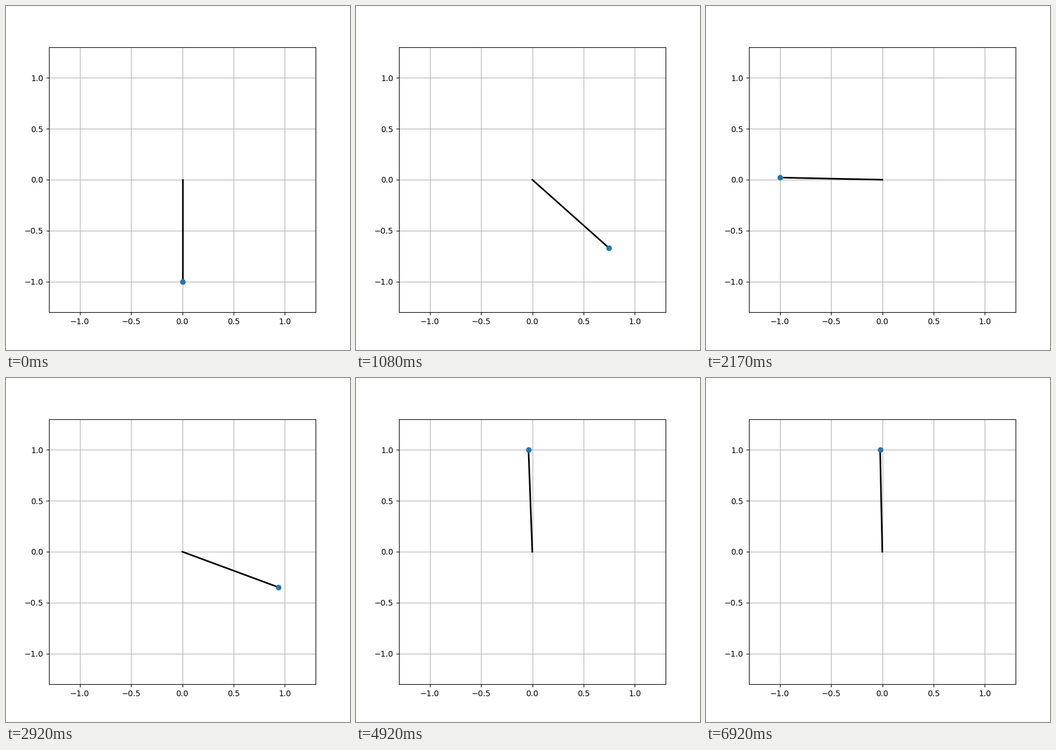
A matplotlib script for the animation above (7.01 s loop, 600 by 600 pixels).

```python
import numpy as np
import matplotlib.pyplot as plt
from matplotlib.animation import FuncAnimation

LOOP = 7010             # ms
FRAMES = 336
INTERVAL = LOOP / FRAMES
LEAD = 28               # ms, so that no pose comes up late
RATE = 12 / 1000        # display ticks per ms
POSES = 70
CATCH = 37              # pose at which the balancing begins

# pose number and angle from hanging straight down, positive to the right
KEY_POSES, KEY_ANGLES = np.array([
    (0, 0), (3, .168), (6, .536), (9, .813), (11, .840), (14, .342),
    (17, -.710), (20, -1.488), (22, -1.592), (25, -.895), (28, .687),
    (31, 2.085), (34, 2.831), (CATCH, 3.0885),
]).T


def spline(x, y, at):
    """Cubic spline through (x, y) that is at rest at both ends."""
    h = np.diff(x)
    slope = np.diff(y) / h
    pad = np.concatenate([[0], h, [0]])
    system = (np.diag(2 * (pad[:-1] + pad[1:]))
              + np.diag(h, 1) + np.diag(h, -1))
    m = np.linalg.solve(system, 6 * np.diff(slope, prepend=0, append=0))
    k = np.clip(np.searchsorted(x, at, side="right") - 1, 0, len(x) - 2)
    a, b, w = x[k + 1] - at, at - x[k], h[k]
    return ((m[k] * a**3 + m[k + 1] * b**3) / (6 * w)
            + (y[k] / w - m[k] * w / 6) * a
            + (y[k + 1] / w - m[k + 1] * w / 6) * b)


def balance(pose):
    """Upright with a fading overshoot and a small steady wobble."""
    settle = .12 * np.exp(-((pose - CATCH) / 5)**2)
    wobble = -.043 - .024 * np.cos(2 * np.pi * (pose - CATCH) / 7)
    return np.pi - np.arcsin(settle + wobble)


def pose_at(ms):
    """Ten poses a second on a twelve-tick clock: every sixth tick holds."""
    tick = int(ms * RATE)
    return min(tick - (tick + 3) // 6, POSES - 1)


poses = np.arange(POSES)
angles = np.concatenate([spline(KEY_POSES, KEY_ANGLES, poses[:CATCH]),
                         balance(poses[CATCH:])])

fig, ax = plt.subplots(figsize=(6, 6), dpi=100)
ax.set_xlim(-1.3, 1.3)
ax.set_ylim(-1.3, 1.3)
ax.grid(True)
rod, = ax.plot([], [], color="black", lw=2)
bob, = ax.plot([], [], "o", color="C0")


def update(frame):
    angle = angles[pose_at(frame * INTERVAL + LEAD)]
    x, y = np.sin(angle), -np.cos(angle)
    rod.set_data([0, x], [0, y])
    bob.set_data([x], [y])
    return rod, bob


anim = FuncAnimation(fig, update, frames=FRAMES, interval=INTERVAL,
                     repeat=True, repeat_delay=0)
plt.show()
```
